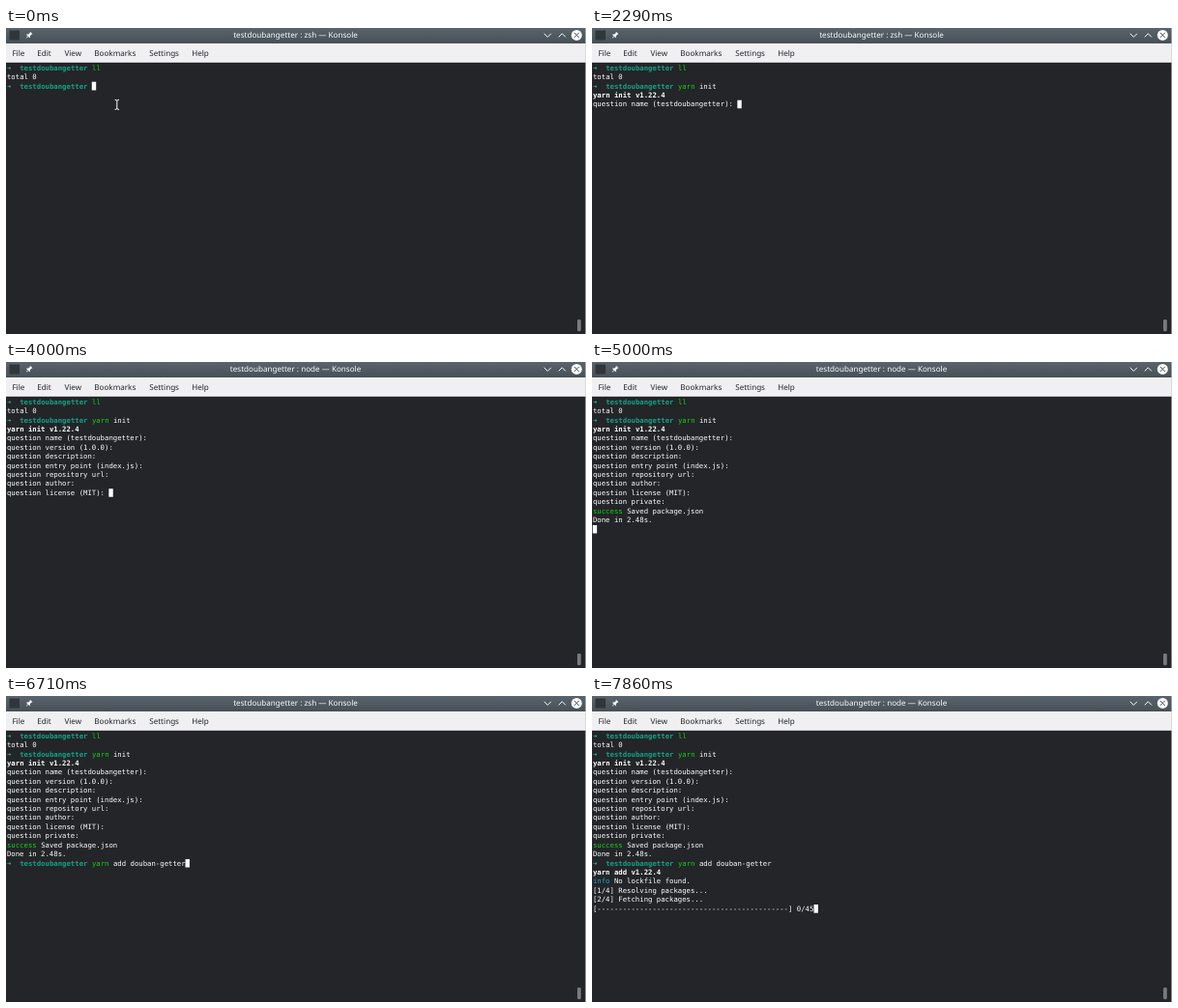
An HTML page that plays this animation: 600x317 px, repeating every 8000 ms.

```html
<!DOCTYPE html>
<html lang="en">
<head>
<meta charset="utf-8">
<title>Terminal session</title>
<style>
  html, body { margin: 0; height: 100%; overflow: hidden; background: #232528; }
  svg { display: block; width: 100vw; height: 100vh; }
  text { white-space: pre; text-rendering: geometricPrecision; }
  .ui { font: 8.11px "Noto Sans", sans-serif; fill: #232629; }
  #title { fill: #fcfcfc; text-anchor: middle; }
  /* The tiny rotation lets baselines fall between whole pixels. */
  #screen { font: 7.31px "DejaVu Sans Mono", monospace; transform: rotate(.02deg); }
  .plain { fill: #fcfcfc; }
  .bold { fill: #fcfcfc; font-weight: bold; }
  .arrow { fill: #1cb98a; font-weight: bold; }
  .dir { fill: #16a085; font-weight: bold; }
  .good { fill: #11d116; }
  .bad { fill: #c0392b; font-weight: bold; }
  .info { fill: #1fa0c8; }
  .hint { fill: #7f8c8d; }
  .under { fill: #232528; }
</style>
</head>
<body>
<svg viewBox="0 0 600 317">
  <defs>
    <linearGradient id="bar" x2="0" y2="1">
      <stop offset="0" stop-color="#5a646c"/>
      <stop offset="1" stop-color="#475057"/>
    </linearGradient>
  </defs>
  <rect width="600" height="317" fill="#232528"/>
  <rect width="600" height="16" fill="url(#bar)"/>
  <rect y="16" width="600" height="19.8" fill="#f0eff2"/>
  <rect x="3.5" y="2.5" width="10.5" height="10" fill="#31363b"/>
  <g transform="translate(24 7.4) rotate(45) scale(.8)" fill="#fcfcfc">
    <path d="M-2-4h4v1h-.6v3l1.6 1.6v.6h-6v-.6l1.6-1.6v-3H-2z"/>
    <path d="M-.4 2h.8v3h-.8z"/>
  </g>
  <g fill="none" stroke="#fcfcfc" stroke-width="1">
    <path d="M556.7 5.8l3.6 3.6 3.6-3.6M571.7 9.4l3.6-3.6 3.6 3.6"/>
  </g>
  <circle cx="590.3" cy="7.4" r="5.5" fill="#fcfcfc"/>
  <path d="M587.8 4.9l5 5m0-5l-5 5" stroke="#475057" stroke-width="1"/>
  <text id="title" class="ui" x="299.5" y="10.3"></text>
  <g class="ui">
    <text x="6.4" y="29.4">File</text>
    <text x="32.2" y="29.4">Edit</text>
    <text x="60.4" y="29.4">View</text>
    <text x="91.3" y="29.4">Bookmarks</text>
    <text x="148.2" y="29.4">Settings</text>
    <text x="192.2" y="29.4">Help</text>
  </g>
  <rect x="591" y="302" width="3.8" height="12.2" rx="1.4" fill="#787a7c"/>
  <rect x="599.4" width=".6" height="317" fill="#c8cacb"/>
  <g id="screen"></g>
  <path id="pointer" d="M112.6 74.3q2.2 0 2.2 1.4v7.4q0 1.4-2.2 1.4m4.4-10.2q-2.2 0-2.2 1.4m0 7.4q0 1.4 2.2 1.4"
        fill="none" stroke="#fcfcfc" stroke-width="1"/>
</svg>
<script>
const LOOP = 8000, LEFT = 1, TOP = 36.8, CELL = 4.4, LINE = 9.42, BASELINE = 6.9;
const byId = id => document.getElementById(id);
const screen = byId('screen');

const plain = text => [['plain', text]];
const bold = text => [['bold', text]];
const ask = text => plain(`question ${text}: `);

// A shell prompt with the typed command and its greyed suggestion.
function prompt(typed = '', hint = '') {
  const [, command, rest] = typed.match(/^(\S*)(.*)$/);
  const known = command === 'yarn' || command === 'll';
  return [['arrow', '➜  '], ['dir', 'testdoubangetter'], ['plain', ' '],
    [known ? 'good' : 'bad', command], ['plain', rest], ['hint', hint]];
}

function typing(row, full, keys) {
  return keys.map(([time, count]) =>
    [time, row, prompt(full.slice(0, count), full.slice(count))]);
}

// Each entry: time in ms, row, runs of [style, text].
const output = [
  [0, 0, prompt('ll')],
  [0, 1, plain('total 0')],
  [0, 2, prompt()],
  ...typing(2, 'yarn add douban-getter', [[290, 1], [570, 2], [710, 3], [860, 4], [1140, 5]]),
  ...typing(2, 'yarn init', [[1290, 6], [1430, 7], [1570, 9]]),
  [1860, 3, []],
  [2140, 3, bold('yarn init v1.22.4')],
  [2290, 4, ask('name (testdoubangetter)')],
  [2570, 5, ask('version (1.0.0)')],
  [2860, 6, ask('description')],
  [3140, 7, ask('entry point (index.js)')],
  [3430, 8, ask('repository url')],
  [3710, 9, ask('author')],
  [4000, 10, ask('license (MIT)')],
  [4290, 11, ask('private')],
  [4860, 12, [['good', 'success'], ['plain', ' Saved package.json']]],
  [4860, 13, plain('Done in 2.48s.')],
  [5000, 14, []],
  [5140, 14, prompt()],
  ...typing(14, 'yarn init', [[5290, 1], [5430, 2], [5570, 3], [5860, 4], [6000, 5]]),
  ...typing(14, 'yarn add douban-getter', [[6140, 6], [6430, 7], [6710, 22]]),
  [6860, 15, []],
  [7000, 15, bold('yarn add v1.22.4')],
  [7000, 16, []],
  [7140, 16, [['info', 'info'], ['plain', ' No lockfile found.']]],
  [7140, 17, plain('[1/4] Resolving packages...')],
  [7140, 18, []],
  [7290, 18, plain('⠁ ')],
  [7430, 18, plain('⠂ ')],
  [7570, 18, plain('⠄ ')],
  [7710, 18, plain('[2/4] Fetching packages...')],
  [7860, 19, plain(`[${'-'.repeat(45)}] 0/45`)],
];
const nodeRuns = [[2430, 5140], [7570, LOOP]];

function add(tag, attributes, text = '') {
  const node = document.createElementNS('http://www.w3.org/2000/svg', tag);
  for (const key in attributes) node.setAttribute(key, attributes[key]);
  node.textContent = text;
  screen.append(node);
}

function write(style, text, column, row) {
  add('text', { class: style, x: LEFT + column * CELL, y: TOP + row * LINE + BASELINE }, text);
}

function drawRow(runs, row, hasCursor) {
  let column = 0, cursor = 0, hint = '';
  for (const [style, text] of runs) {
    if (text) write(style, text, column, row);
    column += text.length;
    if (style === 'hint') hint = text;
    else cursor = column;
  }
  if (!hasCursor) return;
  add('rect', {
    class: hint ? 'hint' : 'plain',
    x: LEFT + cursor * CELL - .2, y: TOP + row * LINE + .2, width: CELL, height: 8.6,
  });
  if (hint) write('under', hint[0], cursor, row);
}

function draw(time) {
  const rows = [];
  for (const [start, row, runs] of output) if (start <= time) rows[row] = runs;
  screen.replaceChildren();
  rows.forEach((runs, row) => drawRow(runs, row, row === rows.length - 1));
  const inNode = nodeRuns.some(([from, to]) => time >= from && time < to);
  byId('title').textContent = `testdoubangetter : ${inNode ? 'node' : 'zsh'} — Konsole`;
  byId('pointer').style.display = time < 140 ? '' : 'none';
}

const changes = [...new Set([140, ...nodeRuns.flat(), ...output.map(([time]) => time)])];
const origin = performance.now();
let shown = -1;

function tick() {
  const time = Math.max(0, performance.now() - origin) % LOOP;
  const latest = Math.max(...changes.filter(change => change <= time));
  if (latest !== shown) draw(shown = latest);
  requestAnimationFrame(tick);
}
tick();
</script>
</body>
</html>
```
